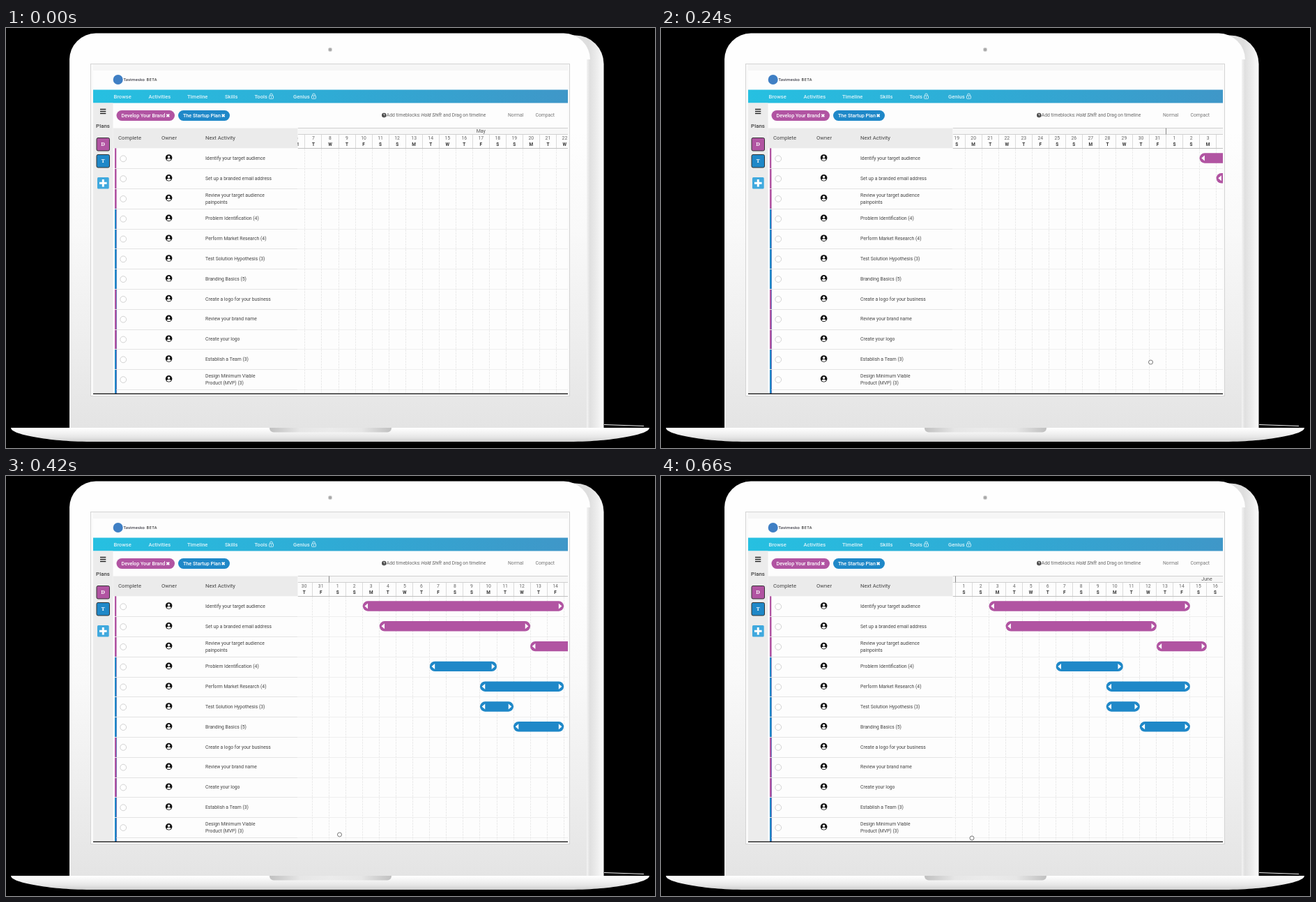
Recreate the animation shown at these times as an HTML page with a canvas. Size 931 px wide and 602 px high, loop 2.66 s.

```html
<!DOCTYPE html>
<html lang="en">
<head>
<meta charset="utf-8">
<title>Plan timeline</title>
<style>
html, body { margin: 0; width: 100%; height: 100%; overflow: hidden; background: #000; }
canvas { display: block; }
</style>
</head>
<body>
<canvas id="stage" width="931" height="602"></canvas>
<script>
const c = document.getElementById('stage').getContext('2d');
const PURPLE = '#b154a2', BLUE = '#1f88c8';
const LOOP = 2660, STEP = 60, DAY = 24.03, ROW = 28.8;
const GRID = { left: 418.5, right: 806, top: 143.5, bottom: 523.5 };

// Left edge of June 1 at each step of the drag
const scroll = [1029.7, 1024, 1003.7, 880, 724.5, 580, 504.8, 463.7, 438, 426, 424, 422.5];
// Pointer position, once it is over the grid
const pointer = { 4: [702.5, 479], 5: [578, 494], 6: [509.5, 505], 7: [478.5, 514],
  8: [457, 518], 9: [447, 519], 10: [446.5, 519], 11: [446, 519] };

// Label, plan colour, first and last day of the block (from June 1)
const rows = [
  ['Identify your target audience', PURPLE, 2, 14],
  ['Set up a branded email address', PURPLE, 3, 12],
  ['Review your target audience|painpoints', PURPLE, 12, 15],
  ['Problem Identification (4)', BLUE, 6, 10],
  ['Perform Market Research (4)', BLUE, 9, 14],
  ['Test Solution Hypothesis (3)', BLUE, 9, 11],
  ['Branding Basics (5)', BLUE, 11, 14],
  ['Create a logo for your business', PURPLE],
  ['Review your brand name', PURPLE],
  ['Create your logo', PURPLE],
  ['Establish a Team (3)', BLUE],
  ['Design Minimum Viable|Product (MVP) (3)', BLUE]
];
const rowY = i => 186.5 + ROW * i;

function rect(x, y, w, h, fill) {
  c.fillStyle = fill;
  c.fillRect(x, y, w, h);
}
function round(x, y, w, h, r, fill, stroke) {
  c.beginPath();
  c.roundRect(x, y, w, h, r);
  paint(fill, stroke);
}
function circle(x, y, r, fill, stroke) {
  c.beginPath();
  c.arc(x, y, r, 0, 7);
  paint(fill, stroke);
}
function paint(fill, stroke) {
  if (fill) { c.fillStyle = fill; c.fill(); }
  if (stroke) { c.strokeStyle = stroke; c.stroke(); }
}
function shape(d, fill, stroke) {
  const p = new Path2D(d);
  if (fill) { c.fillStyle = fill; c.fill(p); }
  if (stroke) { c.strokeStyle = stroke; c.stroke(p); }
}
function line(x1, y1, x2, y2, color) {
  c.beginPath();
  c.moveTo(x1, y1);
  c.lineTo(x2, y2);
  paint(null, color);
}
// y is the middle of the capitals
function text(s, x, y, size, color, style = '400', align = 'left', family = 'Roboto, sans-serif') {
  c.font = `${style} ${size}px ${family}`;
  c.textAlign = align;
  c.fillStyle = color;
  c.fillText(s, x, y + size * 0.355);
}
function gradient(x1, y1, x2, y2, ...colors) {
  const g = c.createLinearGradient(x1, y1, x2, y2);
  colors.forEach((k, i) => g.addColorStop(i / (colors.length - 1), k));
  return g;
}
function cross(x, y, r) {
  c.lineWidth = 1.7;
  line(x - r, y - r, x + r, y + r, '#fff');
  line(x - r, y + r, x + r, y - r, '#fff');
  c.lineWidth = 1;
}

function laptop() {
  rect(0, 0, 931, 602, '#000');
  round(150, 10.5, 707.5, 562.5, [0, 41, 0, 0], gradient(836, 0, 858, 0, '#dedede', '#ececec', '#fdfdfd'));
  round(91, 7.5, 747, 565.5, [38, 38, 0, 0], gradient(0, 150, 0, 573, '#fefefe', '#f9f9f9', '#efefef', '#e4e4e4'));
  rect(91, 45, 2, 528, '#e9e9e9');
  rect(833, 45, 5, 528, gradient(833, 0, 838, 0, '#f4f4f4', '#dedede'));
  circle(465, 31, 2.7, '#a9a9a9', '#d8d8d8');
  line(858, 568.5, 915, 570.5, '#f2f2f2');
  shape('M7 573H923C922 579 908 583 885 587C860 591 840 593 800 593H130C90 593 70 591 45 587C22 583 8 579 7 573Z',
    gradient(0, 573, 0, 593, '#fff', '#f4f4f4', '#e6e6e6', '#cfcfcf'));
  round(378, 573, 175, 6.5, [0, 0, 6, 6], gradient(378, 0, 553, 0, '#c0c0c0', '#e6e6e6', '#ebebeb', '#e6e6e6', '#c0c0c0'));
  rect(121.5, 51.5, 687.5, 476, '#fafafa');
  c.strokeStyle = '#d4d4d4';
  c.strokeRect(121.5, 51.5, 687, 476);
  rect(125, 52, 681, 9, '#f6f6f6');
  rect(125, 61, 681, 463, '#fdfdfd');
}

function lock(x) {
  c.lineWidth = 0.9;
  round(x - 3, 97, 6, 4.3, 0.7, null, '#d3f0f9');
  shape(`M${x - 1.8} 97v-1.2a1.8 1.8 0 0 1 3.6 0v1.2`, null, '#d3f0f9');
  rect(x - 0.5, 98.5, 1, 1.5, '#d3f0f9');
  c.lineWidth = 1;
}

function header() {
  circle(160.7, 74, 7, '#3f7fc4');
  text('Tavimesko', 168.5, 74, 6, '#3a3a44', '600', 'left', '"Open Sans", sans-serif');
  c.letterSpacing = '0.6px';
  text('BETA', 201.5, 74, 5.5, '#333', '600', 'left', '"Open Sans", sans-serif');
  c.letterSpacing = '0px';

  rect(125, 88.5, 681, 19, gradient(125, 0, 806, 0, '#26c0e1', '#2fabd5', '#3f97c8'));
  [['Browse', 154.5], ['Activities', 204.5], ['Timeline', 260], ['Skills', 314], ['Tools', 356.5], ['Genius', 412]]
    .forEach(([s, x]) => text(s, x, 98, 7.6, '#d9f3fa', '500'));
  lock(380.5);
  lock(441.5);

  round(158.5, 118, 83.5, 15, 7.5, PURPLE);
  text('Develop Your Brand', 165.5, 125.5, 7.15, '#fff', '500');
  cross(232.3, 125.5, 1.9);
  round(247, 118, 74, 15, 7.5, BLUE);
  text('The Startup Plan', 254, 125.5, 7.2, '#fff', '500');
  cross(311.7, 125.5, 1.9);

  circle(542.3, 125, 3.2, '#444');
  text('?', 542.3, 125, 5.5, '#fff', '700', 'center');
  text('Add timeblocks:', 545.8, 125, 6.8, '#666');
  text('Hold Shift', 595.8, 125, 6.8, '#555', 'italic 400');
  text('and Drag on timeline', 627, 125, 6.7, '#666');
  text('Normal', 720, 125, 6.8, '#777');
  text('Compact', 759.5, 125, 6.8, '#777');
}

function sidebar() {
  rect(125, 107.5, 28.5, 416, '#ececec');
  for (let i = 0; i < 3; i++) rect(135, 115.8 + 3 * i, 8.3, 1.4, '#222');
  text('Plans', 139, 140, 7.9, '#444', '500', 'center');
  [['D', 157.5, PURPLE], ['T', 181.5, BLUE]].forEach(([s, y, color]) => {
    round(130, y, 18.5, 18.5, 2, color, '#333');
    text(s, 139.2, y + 9, 7.5, '#fff', '700', 'center', '"Noto Serif", serif');
  });
  round(131, 214, 16.7, 16.5, 1.5, '#40a9de');
  rect(134, 220.8, 10.6, 3, '#fff');
  rect(137.8, 217, 3, 10.6, '#fff');
}

function owner(x, y) {
  circle(x, y, 4.8, '#111');
  circle(x, y - 1.3, 1.7, '#fff');
  shape(`M${x - 3} ${y + 2.9}q0-1.9 3-1.9t3 1.9q-3 2-6 0z`, '#fff');
}

function table() {
  rect(153.5, 143.5, 265, 28.8, '#ebebeb');
  text('Complete', 161, 157.5, 7.7, '#444');
  text('Owner', 223, 157.5, 7.7, '#444');
  text('Next Activity', 286, 157.5, 7.7, '#444');
  rows.forEach(([label, color], i) => {
    const y = rowY(i), top = y - 14.2;
    // each strip runs on to the bottom; the next row covers the rest
    rect(156, top, 2.3, GRID.bottom - top, color);
    if (i) line(156, Math.round(top) + 0.5, 418.5, Math.round(top) + 0.5, '#e4e4e4');
    circle(168.2, y + 0.8, 4.4, '#fff', '#d2d2d2');
    owner(233.6, y - 0.5);
    const parts = label.split('|');
    parts.forEach((s, k) => text(s, 286, y + (k - (parts.length - 1) / 2) * 10, 6.8, '#444'));
  });
  line(158.5, 518.5, 418.5, 518.5, '#e4e4e4');
}

function block(x1, x2, y, color) {
  round(x1, y - 7.2, x2 - x1, 14.4, 7.2, color);
  shape(`M${x1 + 2.7} ${y}l4.6-4v8z`, '#fff');
  shape(`M${x2 - 2.7} ${y}l-4.6-4v8z`, '#fff');
}

function timeline(june) {
  const { left, right, top, bottom } = GRID;
  c.save();
  c.beginPath();
  c.rect(left, top - 1, right - left, bottom - top + 1);
  c.clip();
  rect(left, top, right - left, 9, '#f7f7f7');

  for (let i = 1; i <= rows.length; i++) {
    const y = Math.round(rowY(i) - 14.2) + 0.5;
    line(left, y, right, y, '#efefef');
  }
  const first = Math.floor((left - june) / DAY);
  for (let d = first; june + d * DAY < right; d++) {
    const x = june + d * DAY, mid = x + DAY / 2, edge = Math.floor(x) + 0.5;
    line(edge, 153, edge, 172, '#dadada');
    c.setLineDash([3, 1]);
    line(edge, 173, edge, bottom, '#ebebeb');
    c.setLineDash([]);
    text(d < 0 ? 32 + d : d + 1, mid, 157.3, 6.8, '#666', '400', 'center');
    text('SSMTWTF'[((d % 7) + 7) % 7], mid, 167, 6.4, '#333', '700', 'center');
  }
  line(left, 143.5, right, 143.5, '#d0d0d0');
  line(left, 152.5, right, 152.5, '#d0d0d0');
  line(left, 172.5, right, 172.5, '#c0c0c0');
  line(Math.floor(june) + 0.5, 143.5, Math.floor(june) + 0.5, 152.5, '#888');
  text('May', june - 14.5 * DAY, 148, 7, '#555', '400', 'center');
  text('June', june + 15 * DAY, 148, 7, '#555', '400', 'center');

  rows.forEach(([, color, from, to], i) => {
    if (to) block(june + from * DAY, june + to * DAY, rowY(i), color);
  });
  c.restore();
}

function draw(now) {
  const step = Math.min(Math.floor(now % LOOP / STEP), scroll.length - 1);
  c.lineWidth = 1;
  laptop();
  header();
  sidebar();
  table();
  timeline(scroll[step]);
  rect(125, 523.7, 681, 1.3, '#111');
  const at = pointer[step];
  if (at) circle(at[0], at[1], 3, '#fff', '#777');
  requestAnimationFrame(draw);
}
requestAnimationFrame(draw);
</script>
</body>
</html>
```
